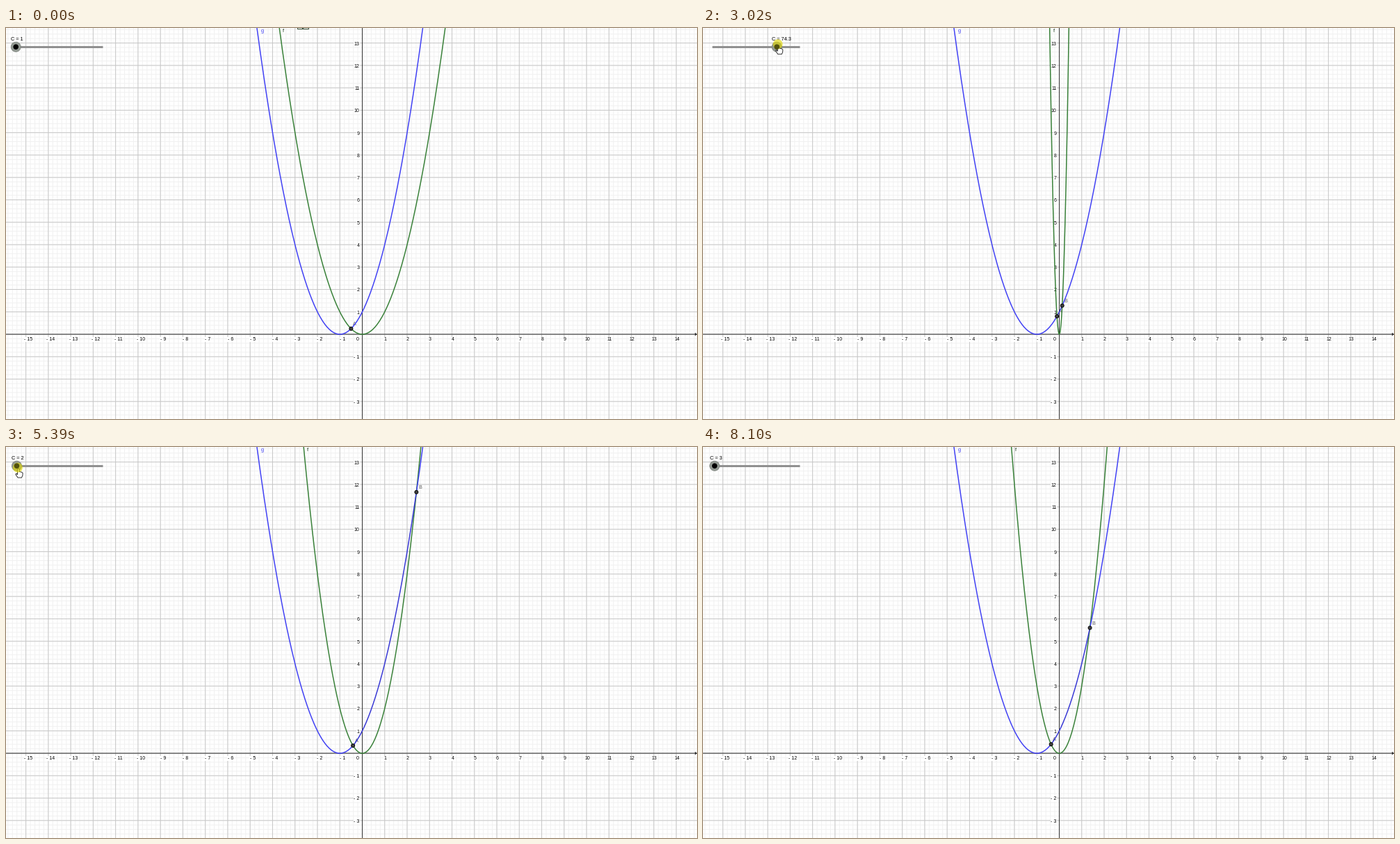
Animation of 994x563 px, one loop 8430 ms. Source, as a matplotlib script:

```python
import math

import matplotlib.pyplot as plt
import numpy as np
from matplotlib.animation import FuncAnimation
from matplotlib.collections import LineCollection
from matplotlib.patches import Circle, Polygon

W, H, DPI = 994, 563, 64
X0, Y0, UNIT = 512.5, 441.0, 32.26
LOOP, STEP = 8430, 30
TICK = LOOP / 50  # the screen refreshes fifty times per loop
PT = 72 / DPI  # points per pixel

# Pointer reaches the knob, lets it go, leaves the stage
GRAB, RELEASE, GONE = 5, 44, 48

# Turning points of the slider drag: (tick, value)
KEYS = np.array([(9, 1), (13, 54), (16, 88), (22, 20.8), (25, 1), (26, 1), (28, 7.4),
                 (29, 9), (32, 2), (33, 1), (36, 3), (37, 3), (40, 8.9), (44, 3)])

HAND = np.array([(-1.2, 0.5), (0, -0.3), (1.2, 0.5), (1.4, 4.4), (5, 5.2), (6.3, 6.6),
                 (6, 10), (4.6, 13), (-0.8, 13), (-4, 8.4), (-3.2, 7), (-1.3, 8.6)])
ARROW = np.array([(0, 0), (0, 12), (2.8, 9.5), (4.6, 13.5), (6.4, 12.7), (4.7, 9), (8, 9)])

BLUE, GREEN, AXIS = "#4040f4", "#388038", "#303030"

fig = plt.figure(figsize=(W / DPI, H / DPI), dpi=DPI, facecolor="white")
ax = fig.add_axes([0, 0, 1, 1])
ax.set_xlim(0, W)
ax.set_ylim(H, 0)
ax.axis("off")


def sx(x):
    return X0 + UNIT * x


def sy(y):
    return Y0 - UNIT * y


def f(x, c):
    return c * x * x


def g(x):
    return (x + 1) ** 2


def label(x, y, s, size=7.0, color="black", ha="center", z=3, **kw):
    return ax.text(x, y, s, fontsize=size * PT, color=color, ha=ha, va="center_baseline",
                   family="Liberation Sans", zorder=z, **kw)


def line(xs, ys, color, width, z, **kw):
    return ax.plot(xs, ys, color=color, lw=width * PT, zorder=z, **kw)[0]


def grid(step, color, z):
    us = np.arange(-80, 80) * step
    segs = [[(sx(u), 0), (sx(u), H)] for u in us if 0 <= sx(u) <= W]
    segs += [[(0, sy(u)), (W, sy(u))] for u in us if 0 <= sy(u) <= H]
    ax.add_collection(LineCollection(segs, colors=color, linewidths=PT, zorder=z, snap=False))


def num(n):
    return str(n).replace("-", "- ")


def draw_stage():
    grid(0.2, "#f1f1f1", 0)
    grid(1, "#c8c8c8", 1)
    line([0, W], [Y0, Y0], AXIS, 1, 4, snap=False)
    line([X0, X0], [0, H], AXIS, 1, 4, snap=False)
    ax.add_patch(Polygon([(W, Y0), (W - 3, Y0 - 2.4), (W - 3, Y0 + 2.4)], fc=AXIS, zorder=4))
    back = dict(bbox=dict(fc="white", ec="none", pad=0.3))
    for n in range(-15, 15):
        if n:
            label(sx(n) + (3.7 if n < 0 else 0.8), 447.6, num(n), **back)
        if n and n >= -3:
            label(508.3, sy(n) + 0.4, num(n), ha="right", **back)
    label(506, 447.6, "0", **back)
    x = np.linspace(-5, 3, 300)
    line(sx(x), sy(g(x)), BLUE, 1.5, 6)
    label(368.5, 4, "g", 7.4, BLUE)
    line([13, 138.5], [27, 27], "#909090", 3, 7, solid_capstyle="butt")


def dot(r, z, **kw):
    return ax.add_patch(Circle((0, 0), r, zorder=z, **kw))


def pointer(shape):
    return ax.add_patch(Polygon(shape, fc="white", ec="#202020", lw=0.9 * PT, zorder=10))


draw_stage()
curve = line([], [], GREEN, 1.5, 5)
arc = line([], [], "#202020", 0.8, 6.5, alpha=0.25)
f_name = label(0, 3.8, "f", 7.4, "#1c3c1c")
c_name = label(0, 15.6, "", 7.4, ha="left", z=9)
points = [dot(2.5, 8, fc="#404040", ec="black", lw=0.9 * PT) for _ in "AB"]
names = [label(0, 0, s, 7.2, "#606060") for s in "AB"]
halo = dot(7, 8, fc="#939a93", ec="#808680", lw=0.8 * PT)
knob = dot(3.8, 12, ec="none")
glow = dot(7, 11, fc="#e0d800", ec="none", alpha=0.62)
hand, arrow = pointer(HAND), pointer(ARROW)
corners = [line([a, a, a + 7.5, a + 7.5], [-1, 1, 1, -1], "#304830", 1, 10)
           for a in (418.5, 427)]


def smooth_keys(t, keys):
    """Monotone cubic through the keys: flat at every turning point."""
    ts, vs = keys.T
    rate = np.diff(vs) / np.diff(ts)
    slope = np.zeros(len(ts))
    for j, (a, b) in enumerate(zip(rate, rate[1:]), 1):
        slope[j] = 2 * a * b / (a + b) if a * b > 0 else 0
    t = min(max(t, ts[0]), ts[-1])
    j = min(np.searchsorted(ts, t, side="right"), len(ts) - 1) - 1
    span = ts[j + 1] - ts[j]
    u = (t - ts[j]) / span
    ease = u * u * (3 - 2 * u)
    bend = u * (1 - u) * ((1 - u) * slope[j] - u * slope[j + 1])
    return vs[j] + (vs[j + 1] - vs[j]) * ease + span * bend


def pointer_at(k, slider):
    if 0 < k < GRAB:
        u = (k / GRAB) ** 0.8
        return 427 - 410 * u, 38 * u - 10
    if GRAB <= k < RELEASE:
        return slider + 2.4, 32.2 - 0.07 * slider
    if RELEASE <= k < GONE:
        u = ((k - RELEASE) / 3) ** 2
        return 27 + 535 * u, 24 + 51 * u
    return None


def set_curve(c):
    top = math.sqrt(14.2 / c)
    x = np.linspace(-top, top, 241)
    curve.set_data(sx(x), sy(f(x, c)))
    f_name.set_x(sx(-math.sqrt(Y0 / UNIT / c)) + 5.8)

    root = math.sqrt(c)
    a = -1 / (root + 1)
    b = 1 / (root - 1) if c > 1 else 99
    for x, p, name in zip((a, b), points, names):
        px, py = sx(x), sy(g(x))
        p.center = px, py
        name.set_position((px + 5, py - 7.3))
        for art in (p, name):
            art.set_visible(x < 5)
    x = np.linspace(a, b, 80)
    arc.set_data(sx(x), sy(g(x)))
    arc.set_visible(c > 1)


def update(i):
    k = int((i * STEP + 45) / TICK)
    c = round(float(smooth_keys(k, KEYS)), 1)
    set_curve(c)

    slider = 14.2 + (c - 1) * 1.255
    halo.center = knob.center = slider, 27.2
    c_name.set_text(f"C = {c:g}")
    c_name.set_x(slider - 7)

    spot = pointer_at(k, slider)
    held = GRAB <= k < RELEASE
    knob.set_facecolor("#52520e" if held else "black")
    hand.set_visible(held)
    arrow.set_visible(spot is not None and not held)
    glow.set_visible(spot is not None)
    if spot:
        x, y = spot
        glow.center = (x - 1, y - 1.5) if held else spot
        hand.set_xy(HAND + spot)
        arrow.set_xy(ARROW + spot)
    for art in corners:
        art.set_visible(k == 0)
    return []


anim = FuncAnimation(fig, update, frames=LOOP // STEP, interval=STEP, repeat=True,
                     repeat_delay=0, blit=False, cache_frame_data=False)
plt.show()
```
